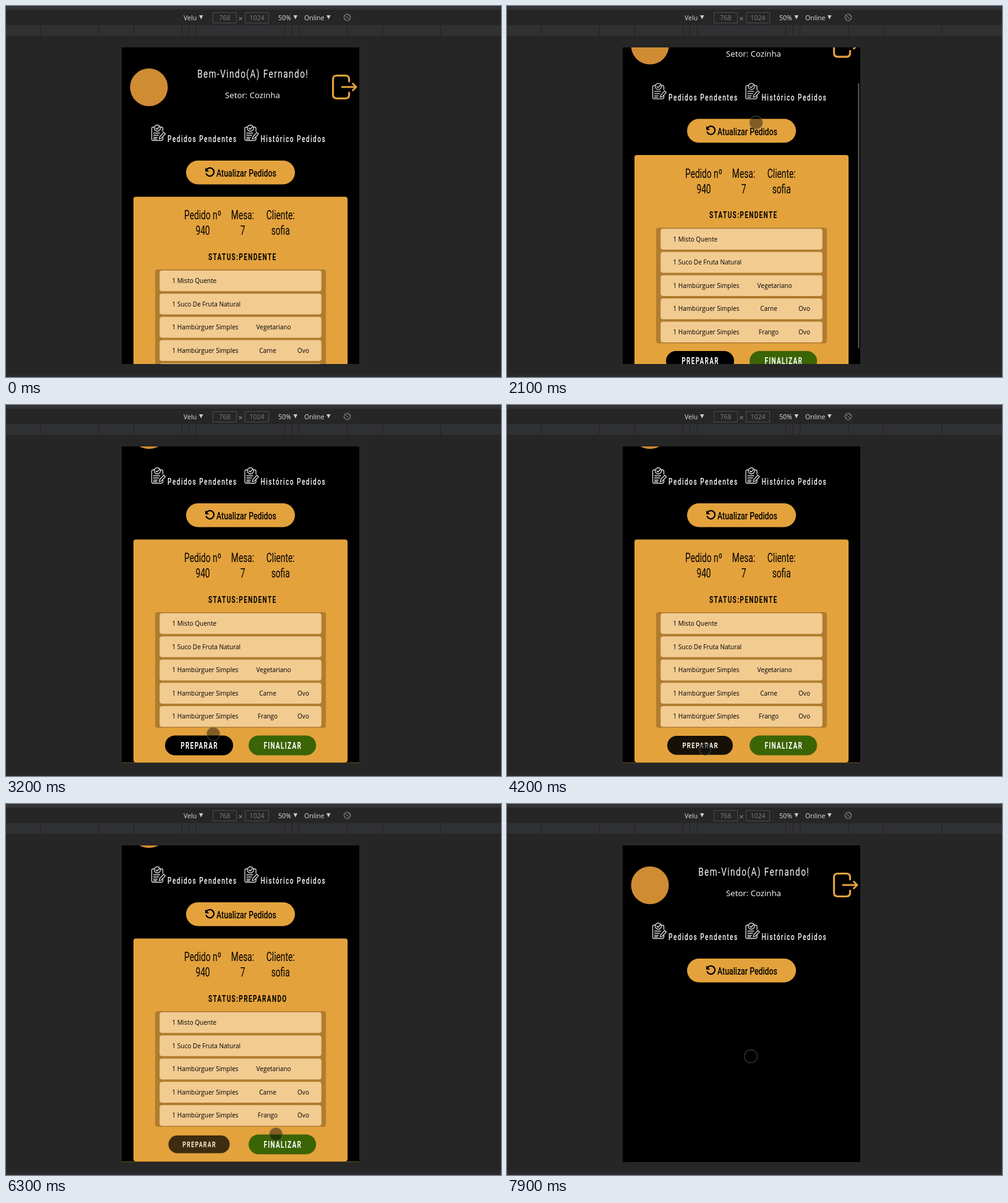
An HTML page for the animation above (8 s loop, 800 px wide and 600 px high).

```html
<!DOCTYPE html>
<html lang="pt">
<head>
<meta charset="utf-8">
<title>Pedidos da cozinha</title>
<style>
  html, body { margin: 0; width: 100%; height: 100%; overflow: hidden; background: #262626; }
  #stage { display: block; width: 100vw; height: 100vh; }
  text { font-family: "Open Sans", "Noto Sans", sans-serif; white-space: pre; }
  .bar text { font-size: 10.6px; fill: #ddd; }
  .bar .dim { fill: #7d7d7d; text-anchor: middle; }
  .narrow text { font-family: Roboto, "Liberation Sans", sans-serif; }
  .mid { text-anchor: middle; }
  .item { font-size: 10px; }
</style>
</head>
<body>
<svg id="stage" viewBox="0 0 800 600">
  <defs>
    <g id="clipboard" fill="none" stroke="#ddd" stroke-width="1.3" stroke-linecap="round" stroke-linejoin="round">
      <path d="M5 4H3Q1 4 1 6V23Q1 25.500 3 25.500H16Q19 25.500 19 23V20M19 11V6Q19 4 17 4H15"/>
      <circle cx="10" cy="5.500" r="5"/>
      <path d="M7.500 5.500L9.500 7.500L13 3.500M4 13.500H14M4 17H12M4 20.500H10M4 23H9"/>
      <path d="M13 23L14 19.500L20.500 12.500L23 15L16.500 22Z"/>
    </g>
  </defs>

  <rect width="800" height="600" fill="#262626"/>
  <rect width="800" height="6" fill="#333335"/>
  <rect y="31" width="800" height="17" fill="#303133"/>
  <rect y="595" width="800" height="5" fill="#2a2a2a"/>
  <path id="ruler" stroke="#212121"/>
  <g class="bar">
    <text x="287" y="23">Velu</text>
    <text x="440" y="23">50%</text>
    <text x="482" y="23">Online</text>
    <path fill="#ccc" d="M312 15h6.500l-3.250 6.500zM464.500 15h6.500l-3.250 6.500zM518 15h6.500l-3.250 6.500z"/>
    <path fill="none" stroke="#4c4c4c" d="M334.500 10.500h38v17h-38zM386.500 10.500h38v17h-38z"/>
    <text class="dim" x="353.500" y="23">768</text>
    <text class="dim" x="405.500" y="23">1024</text>
    <path stroke="#aaa" d="M376.500 18l5 5m0-5l-5 5"/>
    <g fill="none" stroke="#969696"><circle cx="551.500" cy="18.500" r="5.300"/><path d="M547.500 15l8 7M549 21.500l-2-2M556 17.500l-3-3"/></g>
  </g>

  <svg x="187" y="67" width="384" height="512" viewBox="187 67 384 512">
    <rect x="187" y="67" width="384" height="512" fill="#000"/>
    <g id="page">
      <circle cx="231" cy="131.500" r="30.500" fill="#d08c33"/>
      <text class="mid" x="398.500" y="149" font-size="13.200" fill="#fff">Setor: Cozinha</text>
      <g fill="none" stroke="#e3a23c" stroke-width="3.200" stroke-linecap="round" stroke-linejoin="round">
        <path d="M554.500 122V118.500Q554.500 112.500 548.500 112.500H534.500Q528.500 112.500 528.500 118.500V143.500Q528.500 149.500 534.500 149.500H548.500Q554.500 149.500 554.500 143.500V140"/>
        <path d="M543 131H566M560.500 125.500L566 131L560.500 136.500" stroke-width="2.800"/>
      </g>
      <use href="#clipboard" x="234.500" y="192"/>
      <use href="#clipboard" x="385" y="192"/>
      <rect x="291" y="250" width="176" height="38.500" rx="19.250" fill="#e3a23c"/>
      <path d="M323.600 265.500A6.600 6.600 0 1 1 323.200 270.500" fill="none" stroke="#000" stroke-width="2.200"/>
      <path d="M322 261.500V267.800H328.300Z"/>
      <g id="head" class="narrow"></g>
      <g id="order">
        <rect x="206" y="308.500" width="346" height="360.500" rx="4" fill="#e3a23c"/>
        <rect x="187" y="669" width="384" height="1" fill="#6b4c1c"/>
        <rect x="241" y="426" width="276" height="187" rx="4" fill="#b07c2f"/>
        <g id="items"></g>
        <g id="info" class="narrow"></g>
        <g id="prepare" class="narrow"><rect x="-55" y="-16" width="110" height="32" rx="16"/></g>
        <g id="finish" class="narrow"><rect x="-54.500" y="-16" width="109" height="32" rx="16" fill="#3b6405"/></g>
      </g>
    </g>
    <rect id="thumb" x="567.300" width="2" height="429" rx="1" fill="#5a5a5a"/>
  </svg>
  <circle id="touch" r="10.500" stroke="#6e6e6e" stroke-opacity=".46" stroke-width="1.400"/>
</svg>

<script>
const NS = "http://www.w3.org/2000/svg";
const LOOP = 8000, STEP = 100;
const NARROW = 0.71; // one factor turns the wide face into a condensed one
const $ = id => document.getElementById(id);

function add(parent, tag, attrs, content) {
  const el = document.createElementNS(NS, tag);
  for (const key in attrs) el.setAttribute(key, attrs[key]);
  if (content) el.textContent = content;
  parent.appendChild(el);
  return el;
}

function narrow(parent, x, y, size, content, { weight = 400, gap = 0, fill = "#000", mid = false } = {}) {
  return add(parent, "text", {
    transform: `translate(${x + (mid ? gap / 2 : 0)} ${y}) scale(${NARROW} 1)`,
    "font-size": size, "font-weight": weight, fill,
    "letter-spacing": gap / NARROW,
    "text-anchor": mid ? "middle" : "start"
  }, content);
}

// Static parts
$("ruler").setAttribute("d", [71.5, 83.5, 94.5, 172.5, 229.5, 323.5]
  .map(d => `M${379 - d} 31v17M${379 + d} 31v17`).join(""));

const white = { fill: "#fff", gap: 1.5 };
narrow($("head"), 398.5, 115.5, 19, "Bem-Vindo(A) Fernando!", { ...white, mid: true });
narrow($("head"), 261, 220, 14.2, "Pedidos Pendentes", { ...white, weight: 500 });
narrow($("head"), 411.5, 220, 14.2, "Histórico Pedidos", { ...white, weight: 500 });
narrow($("head"), 340, 276, 17.3, "Atualizar Pedidos", { weight: 500 });

[[318, "Pedido nº", "940"], [382.5, "Mesa:", "7"], [443.7, "Cliente:", "sofia"]].forEach(([x, label, value]) => {
  narrow($("info"), x, 345, 19.4, label, { mid: true });
  narrow($("info"), x, 370, 19.4, value, { mid: true });
});
const bold = { weight: 600, gap: 1.35 };
const status = narrow($("info"), 327, 410.5, 14.2, "", bold);

const burger = "1 Hambúrguer Simples";
[["1 Misto Quente"], ["1 Suco De Fruta Natural"], [burger, "Vegetariano"],
 [burger, "Carne", "Ovo"], [burger, "Frango", "Ovo"]].forEach(([name, filling, extra], i) => {
  const y = 427.7 + i * 37.55;
  const label = (x, content, cls) => content && add($("items"), "text", { x, y: y + 20.3, class: cls }, content);
  add($("items"), "rect", { x: 248.3, y, width: 261.4, height: 33.6, rx: 4, fill: "#f2cb91" });
  label(268.5, name, "item");
  label(filling === "Vegetariano" ? 432.5 : 423, filling, "item mid");
  label(480.5, extra, "item mid");
});

narrow($("prepare"), 0, 5.2, 14, "PREPARAR", { ...bold, fill: "#fff", mid: true });
narrow($("finish"), 0, 5.2, 14, "FINALIZAR", { ...bold, fill: "#fff", mid: true });

// Motion
const clamp = v => Math.max(0, Math.min(1, v));
const span = (t, from, to) => clamp((t - from) / (to - from));
const smooth = p => p * p * (3 - 2 * p);
const easeOut = p => 1 - (1 - p) ** 2;

const path = [
  [600, 103, 74], [900, 505, 400], [1100, 388, 227], [1200, 388, 227], [1600, 402, 189],
  [2500, 403, 188], [2900, 392, 400], [3000, 392, 400], [3200, 335, 532], [3300, 335, 532],
  [3600, 328, 574], [3900, 320, 557], [4400, 320, 557], [4900, 275, 309], [5300, 276, 308],
  [5400, 312, 313], [5800, 455, 313], [6200, 440, 530], [6600, 425, 547], [7400, 425, 547],
  [7900, 394, 408]
];

function touchAt(t) {
  const next = path.findIndex(k => k[0] > t);
  if (next < 0) return path[path.length - 1].slice(1);
  if (next === 0) return path[0].slice(1);
  const [a, ax, ay] = path[next - 1], [b, bx, by] = path[next];
  const p = (t - a) / (b - a);
  return [ax + (bx - ax) * p, ay + (by - ay) * p];
}

function setButton(id, x, held) {
  const el = $(id);
  el.setAttribute("transform", `translate(${x} 641.4) scale(${1 - 0.1 * held})`);
  el.setAttribute("opacity", 1 - 0.28 * held);
}

function draw(t) {
  const done = t >= 7500;
  const scroll = done || t < 1800 ? 0 : 91 * smooth(span(t, 1700, 2300));
  $("page").setAttribute("transform", `translate(0 ${-scroll})`);
  $("order").setAttribute("visibility", done ? "hidden" : "visible");
  $("thumb").setAttribute("y", 68 + scroll * 0.845);
  $("thumb").setAttribute("opacity", t < 1800 ? 0 : 1 - span(t, 2500, 2900));

  status.textContent = "STATUS:" + (t < 4600 ? "PENDENTE" : "PREPARANDO");
  const release = easeOut(span(t, 6980, 7380));
  setButton("prepare", 312, easeOut(span(t, 4120, 4520)) - release);
  setButton("finish", 446.6, release);

  const [x, y] = touchAt(t);
  const pressed = (t >= 4100 && t < 4300) || (t >= 6900 && t < 7200);
  const touch = $("touch");
  touch.setAttribute("visibility", t < 600 ? "hidden" : "visible");
  touch.setAttribute("cx", x);
  touch.setAttribute("cy", y);
  touch.setAttribute("r", pressed ? 9.5 : 10.5);
  touch.setAttribute("fill", pressed ? "rgba(20,20,20,.62)" : "rgba(0,0,0,.43)");
}

const start = performance.now();
function tick() {
  const t = (performance.now() - start) % LOOP;
  draw(Math.floor(t / STEP) * STEP);
  requestAnimationFrame(tick);
}
tick();
</script>
</body>
</html>
```
